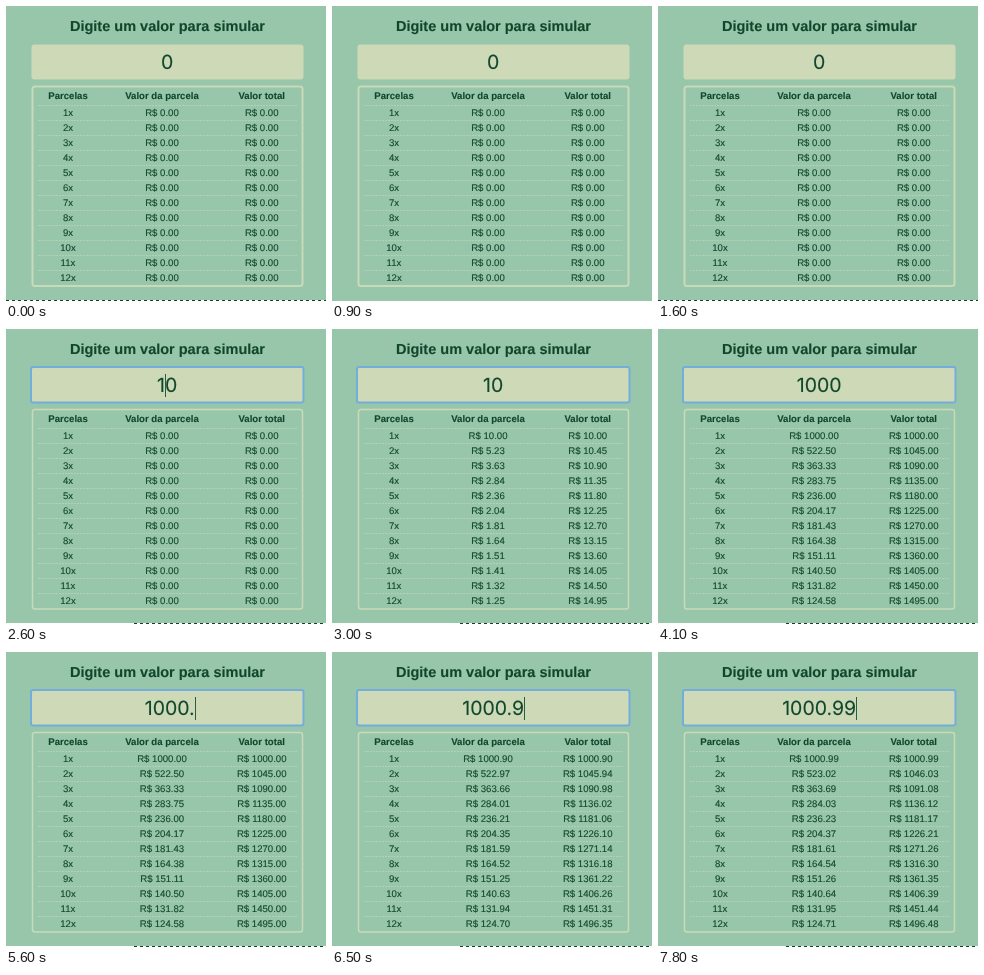
An HTML page that plays this animation: 320x295 px, repeating every 8000 ms.

```html
<!DOCTYPE html>
<html lang="pt-BR">
<head>
<meta charset="utf-8">
<title>Simulador de parcelas</title>
<style>
  html, body { margin: 0; width: 100%; height: 100%; overflow: hidden; background: #98c6aa; }
  svg { display: block; }
  text {
    font: 9.6px "Liberation Sans", Arial, sans-serif; text-anchor: middle;
    text-rendering: geometricPrecision; fill: #10472c; stroke: #10472c; stroke-width: .12px;
  }
  .title { font-size: 14.5px; font-weight: bold; }
  .head { font-weight: bold; }
  #value { font: 19.5px Inter, sans-serif; text-anchor: start; }
</style>
</head>
<body>
<svg width="320" height="295" viewBox="0 0 320 295">
  <text class="title" x="161.5" y="25.3">Digite um valor para simular</text>
  <rect x="25.5" y="38.5" width="272" height="35" rx="3" fill="#cdd9b7"/>
  <rect id="ring" x="25" y="38" width="272.5" height="35.5" rx="2" fill="none" stroke="#74addb" stroke-width="2"/>
  <text id="value" y="63"></text>
  <rect id="caret" y="45" width="1" height="23" fill="#2c5b43"/>
  <rect id="frame" x="26.5" y="80.5" width="270" height="199.5" rx="2.5" fill="none" stroke="#c9dab9"/>
  <g id="table"></g>
  <g id="edge">
    <path d="M0 294.5H320" stroke="#fff"/>
    <path id="ants" stroke="#173c2a" stroke-dasharray="3 3"/>
  </g>
</svg>
<script>
const LOOP = 8000, FOCUS = 2300, MIDDLE = 161.2, COLUMNS = [62, 156, 255.7];
// [time, typed text, caret index]
const typing = [
  [0, '0', 0], [2500, '10', 1], [3200, '100', 2], [3700, '1000', 3],
  [4200, '1000', 4], [5300, '1000.', 5], [6000, '1000.9', 6], [7500, '1000.99', 7]
];
const caretOn = [[2300, 3000], [3200, 4100], [4600, 5100], [5600, 6600], [7100, 8000]];
const TABLE_DELAY = { 2500: 150 };

const $ = id => document.getElementById(id);
const [ring, value, caret, frame, table, edge, ants] =
  ['ring', 'value', 'caret', 'frame', 'table', 'edge', 'ants'].map($);

function add(name, attributes, content = '') {
  const node = document.createElementNS('http://www.w3.org/2000/svg', name);
  for (const key in attributes) node.setAttribute(key, attributes[key]);
  node.textContent = content;
  return table.appendChild(node);
}

['Parcelas', 'Valor da parcela', 'Valor total'].forEach((label, i) =>
  add('text', { class: 'head', x: COLUMNS[i], y: 93.3 }, label));

const rows = Array.from({ length: 12 }, (_, i) => {
  const y = 110 + 15 * i;
  add('path', { d: `M32 ${y - 10.5}H291`, stroke: '#b3d1b3', 'stroke-dasharray': '2 1' });
  add('text', { x: COLUMNS[0], y }, `${i + 1}x`);
  return [1, 2].map(c => add('text', { x: COLUMNS[c], y }));
});

const show = (node, on) => node.setAttribute('visibility', on ? 'visible' : 'hidden');
// The small offset makes half cents round up.
const money = amount => 'R$ ' + (amount + 1e-9).toFixed(2);
const widthOf = text => {
  value.textContent = text;
  return text ? value.getComputedTextLength() : 0;
};

function draw(now) {
  const t = now % LOOP;
  const [, text, index] = typing.findLast(([start]) => t >= start);
  const [, amount] = typing.findLast(([start]) => t >= start + (TABLE_DELAY[start] || 0));

  // A trailing dot does not recentre the digits.
  const left = MIDDLE - widthOf(text.replace(/\.$/, '')) / 2;
  caret.setAttribute('x', Math.round(left + widthOf(text.slice(0, index))));
  value.setAttribute('x', left);
  value.textContent = text;

  rows.forEach(([part, total], i) => {
    const sum = Number(amount) * (1 + 0.045 * i);
    part.textContent = money(sum / (i + 1));
    total.textContent = money(sum);
  });

  show(ring, t >= FOCUS);
  show(caret, caretOn.some(([from, to]) => t >= from && t < to));
  frame.setAttribute('stroke-width', t < FOCUS ? 2 : 1.5);
  show(edge, t < 800 || t >= 1000);
  ants.setAttribute('d', `M${t < FOCUS ? 0 : 128} 294.5H320`);
}

function tick() {
  draw(performance.now());
  requestAnimationFrame(tick);
}
tick();
</script>
</body>
</html>
```
